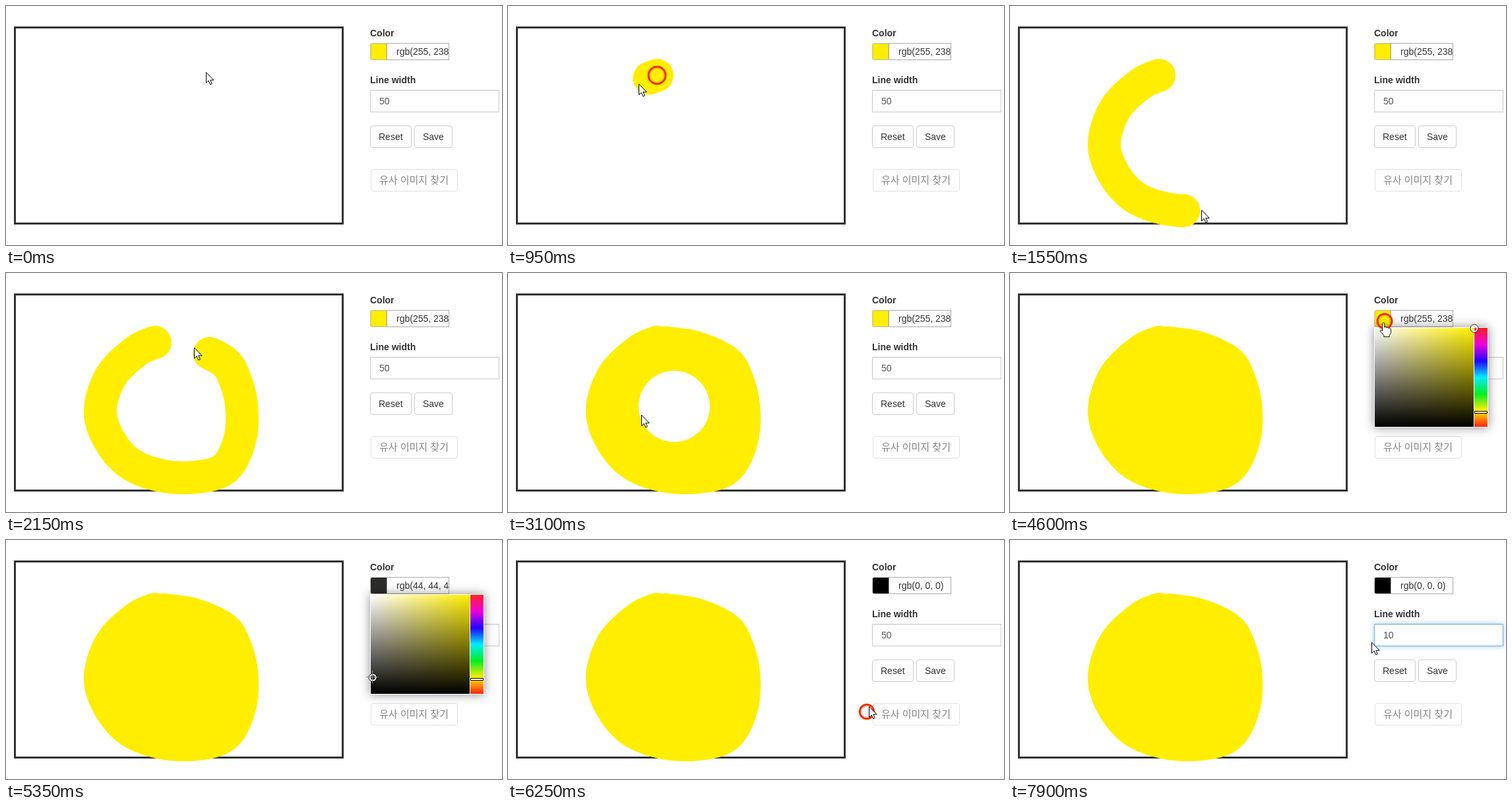
These frames come from a looping animation (752 px wide and 362 px high, 8000 ms). An HTML page with a canvas:

```html
<!DOCTYPE html>
<html lang="ko">
<head>
<meta charset="utf-8">
<title>Drawing board</title>
<style>
  html, body { margin: 0; width: 100%; height: 100%; overflow: hidden; background: #fff; }
  body { position: relative; font: 14px/20px "Liberation Sans", "Noto Sans CJK KR", "Noto Sans CJK", sans-serif; color: #333; }
  body > * { position: absolute; box-sizing: border-box; white-space: pre; }
  canvas { left: 0; top: 0; }
  label { left: 552px; font-weight: bold; }
  .box { border: 1px solid #ccc; border-radius: 4px; padding: 6px 12px; height: 34px; }
  #board { left: 12px; top: 31px; width: 500px; height: 300px; border: 3px solid #333; }
  #rgb { left: 577px; top: 56px; width: 95px; height: 26px; border: 1px solid #aaa; padding: 2px 0 0 14px; overflow: hidden; }
  #swatch { left: 552px; top: 56px; width: 25px; height: 26px; border: 1px solid #ccc; border-right: 0; border-radius: 3px 0 0 3px; box-shadow: inset 0 0 0 1px rgba(0,0,0,.1); }
  #width { left: 552px; top: 127px; width: 196px; padding-left: 13px; border-radius: 0; color: #555; box-shadow: inset 0 1px 1px rgba(0,0,0,.075); }
  #width.focus { border-color: #66afe9; box-shadow: inset 0 1px 1px rgba(0,0,0,.075), 0 0 8px rgba(102,175,233,.6); }
  #width.picked span { background: #3390ff; color: #fff; }
</style>
</head>
<body>
<div id="board"></div>
<label style="top:31px">Color</label>
<div id="rgb"></div>
<div id="swatch"></div>
<label style="top:102px">Line width</label>
<div id="width" class="box"><span>50</span></div>
<div class="box" style="left:552px;top:181px;width:63px">Reset</div>
<div class="box" style="left:619px;top:181px;width:58px">Save</div>
<div class="box" style="left:553px;top:247px;width:132px;font-size:15px;opacity:.6">유사 이미지 찾기</div>
<canvas width="752" height="362"></canvas>
<script>
const LOOP = 8000, STEP = 50;
const $ = s => document.querySelector(s);
const c = $('canvas').getContext('2d');
const rgbBox = $('#rgb'), swatch = $('#swatch'), widthBox = $('#width'), widthText = $('#width span');
const clamp = (v, a, b) => Math.min(b, Math.max(a, v));
const smooth = k => k * k * (3 - 2 * k);

// keys are [time, ...values]
function track(keys, t, ease = k => k) {
  const i = clamp(keys.findLastIndex(k => k[0] <= t), 0, keys.length - 2);
  const a = keys[i], b = keys[i + 1];
  const k = ease(clamp((t - a[0]) / (b[0] - a[0]), 0, 1));
  return a.slice(1).map((v, j) => v + (b[j + 1] - v) * k);
}

// outer lap: a spline, one point per 100 ms
const lap = [
  [226,105], [198,118], [160,155], [143,206], [155,250], [187,288], [236,307], [290,309],
  [333,295], [355,250], [357,200], [346,158], [329,133], [285,113], [240,106]
];
// then a spiral inwards: time, angle, radius
const spiral = [[2300,97,97], [2400,135,79], [3100,525,79], [3150,555,52], [3250,575,30], [3550,900,30], [3600,920,8]];

function lapAt(u) {
  const i = Math.floor(u), k = u - i;
  const [a, b, d, e] = [-1, 0, 1, 2].map(n => lap[clamp(i + n, 0, lap.length - 1)]);
  return b.map((v, j) => v + k / 2 * (d[j] - a[j]
    + k * (2 * a[j] - 5 * v + 4 * d[j] - e[j] + k * (3 * (v - d[j]) + e[j] - a[j]))));
}

function brushAt(t) {
  if (t < 2300) return lapAt((t - 900) / 100);
  const [deg, r] = track(spiral, t), a = deg * Math.PI / 180;
  return [252 + r * Math.cos(a), 202 - r * Math.sin(a)];
}

const mouse = [
  [100,303,100], [400,290,58], [800,226,105], [3600, ...brushAt(3600)],
  [4300,566,75], [4700,566,75], [5050,650,142], [5600,483,257],
  [6000,544,259], [6200,544,259], [6250,547,252], [6650,595,138], [7050,548,155]
];
const clicks = [[850,226,105], [4540,568,73], [6195,544,260], [6700,595,138]];

function pointer(t) {
  if (t >= 900 && t < 3600) return brushAt(t + STEP);
  return track(mouse, t < 900 ? Math.min(t, 800) : t, smooth);
}

function line(pts) {
  c.beginPath();
  pts.forEach(p => c.lineTo(...p));
}

function drawBrush(t) {
  if (t < 950) return;
  c.beginPath();
  for (let s = 900; s <= Math.min(t, 3600); s += 10) c.lineTo(...brushAt(s));
  c.lineWidth = 50;
  c.lineCap = c.lineJoin = 'round';
  c.strokeStyle = 'rgb(255,238,0)';
  c.stroke();
}

// position of the handle inside the 150 px colour field
function handleAt(t) {
  if (t < 5050) return [150, 0];
  const [x, y] = pointer(Math.min(t, 5600));
  return [clamp(x - 553, 0, 150), clamp(y - 83, 0, 150)];
}

function colorOf([x, y]) {
  const s = x / 150, v = 1 - y / 150;
  return 'rgb(' + [255, 238, 0].map(h => Math.round(v * (255 + (h - 255) * s))).join(', ') + ')';
}

function fade(x0, y0, x1, y1, colors) {
  const g = c.createLinearGradient(x0, y0, x1, y1);
  colors.forEach((col, i) => g.addColorStop(i / (colors.length - 1), col));
  return g;
}

function rect(fill, x, y, w, h) {
  c.fillStyle = fill;
  c.fillRect(x, y, w, h);
}

function circle(x, y, r, color, w) {
  c.beginPath();
  c.arc(x, y, r, 0, 7);
  c.strokeStyle = color;
  c.lineWidth = w;
  c.stroke();
}

function drawPicker([hx, hy]) {
  c.save();
  c.shadowColor = 'rgba(0,0,0,.45)';
  c.shadowBlur = 14;
  rect('#fff', 552, 82, 173, 152);
  c.restore();
  rect(fade(553, 0, 703, 0, ['#fff', 'rgb(255,238,0)']), 553, 83, 150, 150);
  rect(fade(0, 83, 0, 233, ['rgba(0,0,0,0)', '#000']), 553, 83, 150, 150);
  rect(fade(0, 83, 0, 233, ['#f22', '#e0d', '#20f', '#0ef', '#0e2', '#fe0', '#f21']), 704, 83, 20, 150);
  rect('#000', 704, 209, 20, 4);
  rect('#fff', 705, 210, 18, 2);
  circle(554 + hx, 84 + hy, 6, '#000', 1);
  circle(554 + hx, 84 + hy, 4.5, '#fff', 2);
}

function drawRing(age, x, y) {
  if (age < 0 || age >= 350) return;
  const r = 8 + age * .05;
  c.save();
  c.globalAlpha = clamp((350 - age) / 250, 0, 1);
  circle(x, y, r - .5, 'rgba(255,120,40,.45)', 5);
  circle(x, y, r, '#e8280c', 2.5);
  c.restore();
}

function outline(path) {
  c.fillStyle = '#fff';
  c.strokeStyle = '#000';
  c.lineWidth = 1;
  c.lineJoin = 'miter';
  c.fill(path);
  c.stroke(path);
}

const arrow = new Path2D('M.5.5v16l3.7-3.4 2.6 5.8 2.5-1.1-2.5-5.6h5z');
const hand = new Path2D('M-1.5 1.5Q0-1 2 1.5V8Q4 6 5.5 8.5Q7.5 7 9 9.5Q12 8.5 12.5 12V17L10 21V23.5H1V21L-5 14.5Q-5.5 11-1.5 13.5Z');
const cursors = {
  arrow: () => outline(arrow),
  hand() {
    c.scale(.92, .92);
    outline(hand);
  },
  beam() {
    rect('#000', 0, -8, 1, 16);
    rect('#000', -3, -9, 7, 1);
    rect('#000', -3, 8, 7, 1);
  },
  cross() {
    rect('#888', -9, 0, 19, 1);
    rect('#888', 0, -9, 1, 19);
  }
};

function cursorKind(x, y, open) {
  const inside = (a, b, w, h) => x >= a && x < a + w && y >= b && y < b + h;
  if (inside(553, 57, 25, 25)) return 'hand';
  if (open && inside(553, 83, 150, 150)) return 'cross';
  return inside(553, 127, 195, 34) ? 'beam' : 'arrow';
}

function render(t) {
  const open = t >= 4550 && t < 6200;
  const handle = handleAt(t), color = colorOf(handle);
  rgbBox.textContent = color;
  swatch.style.background = color;
  widthText.textContent = t < 7450 ? '50' : t < 7550 ? '1' : '10';
  widthBox.classList.toggle('focus', t >= 6700);
  widthBox.classList.toggle('picked', t >= 6950 && t < 7450);

  c.clearRect(0, 0, 752, 362);
  drawBrush(t);
  if (open) drawPicker(handle);
  const caret = t >= 6700 && t < 6950 || t >= 7450 && t < 7900;
  if (caret) rect('#333', 565 + 8 * widthText.textContent.length, 136, 1, 16);
  clicks.forEach(([at, x, y]) => drawRing(t - at, x, y));

  const [x, y] = pointer(t).map(Math.round);
  c.save();
  c.translate(x, y);
  cursors[cursorKind(x, y, open)]();
  c.restore();
}

const start = performance.now();
function tick(now) {
  const t = Math.max(0, now - start) % LOOP;
  render(Math.floor(t / STEP) * STEP);
  requestAnimationFrame(tick);
}
render(0);
requestAnimationFrame(tick);
</script>
</body>
</html>
```
